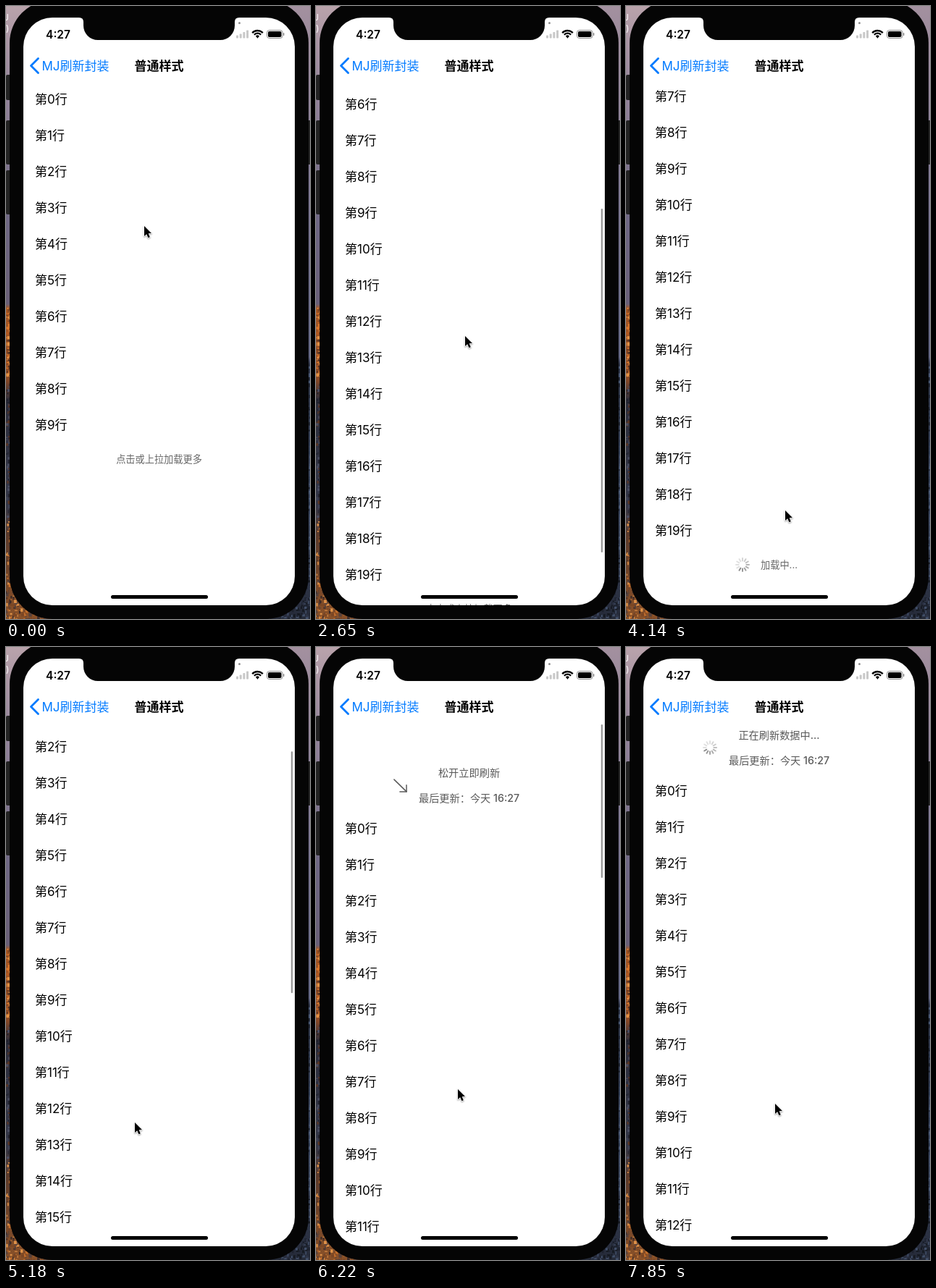
Animation, 420 px wide and 847 px high, one loop 8 s. Source, as an HTML page with a canvas:

```html
<!DOCTYPE html>
<html lang="zh-CN">
<head>
<meta charset="utf-8">
<title>普通样式</title>
<style>
html, body { margin: 0; width: 100%; height: 100%; overflow: hidden; background: #050505; }
canvas { display: block; width: 420px; height: 847px; }
</style>
</head>
<body>
<canvas id="stage"></canvas>
<script>
const W = 420, H = 847, LOOP = 8000, TICKS = 54, STEP = LOOP / TICKS;
const TOP = 104, BOTTOM = 828, ROW = 50, HEADER = 70;
const FONT = 'Inter, "Noto Sans CJK SC", "Noto Sans CJK", sans-serif';
const BLUE = '#007aff', GREY = '#5a5a5a';

const CURSOR = [
  [0, 191, 304], [3, 186, 565], [5, 183, 500], [6, 182, 491], [12, 182, 491],
  [15, 200, 690], [16, 203, 705], [18, 206, 456], [20, 206, 425], [24, 210, 440],
  [28, 220, 697], [31, 190, 394], [32, 187, 408], [33, 184, 488], [34, 181, 578],
  [35, 178, 657], [36, 178, 665], [39, 190, 400], [40, 192, 460], [41, 194, 520],
  [42, 196, 611], [44, 206, 631]
];
const SCROLL = [
  [0, 0], [3, 0], [5, 36], [6, 10], [7, 0], [16, 0], [17, 150], [18, 293], [19, 360],
  [20, 385], [22, 360], [23, 354], [31, 354], [32, 340], [33, 260], [34, 170], [35, 91],
  [36, 40], [37, 12], [38, 0], [39, 0], [40, -42], [41, -72], [42, -122], [44, -132],
  [45, -132], [46, -115], [47, -84], [48, -70]
];
const BAR_ALPHA = [[16, 0], [17, 1], [23, 1], [26, 0], [31, 0], [32, 1], [46, 1], [49, 0]];
const LOADS = [{ from: 5, to: 15, turn: 740 }, { from: 19, to: 29, turn: 3560 }];
const ARMED = 41, RELEASED = 46;

const canvas = document.getElementById('stage');
const dpr = window.devicePixelRatio || 1;
canvas.width = W * dpr;
canvas.height = H * dpr;
let c = canvas.getContext('2d');

const clamp = (v, a, b) => Math.min(b, Math.max(a, v));
const smooth = u => { u = clamp(u, 0, 1); return u * u * (3 - 2 * u); };

function track(keys, t) {
  const i = keys.findIndex(k => k[0] > t);
  if (i === 0) return keys[0].slice(1);
  if (i < 0) return keys[keys.length - 1].slice(1);
  const a = keys[i - 1], b = keys[i], u = (t - a[0]) / (b[0] - a[0]);
  return a.slice(1).map((v, n) => v + (b[n + 1] - v) * u);
}

function text(str, x, cy, size, color, align = 'left', weight = 400) {
  c.font = `${weight} ${size}px ${FONT}`;
  c.fillStyle = color;
  c.textAlign = align;
  c.fillText(str, x, cy + size * 0.37);
}

function box(x, y, w, h, r, color) {
  c.beginPath();
  c.roundRect(x, y, w, h, r);
  c.fillStyle = color;
  c.fill();
}

function line(points, width, color) {
  c.beginPath();
  points.forEach(p => c.lineTo(p[0], p[1]));
  c.lineWidth = width;
  c.strokeStyle = color;
  c.stroke();
}

function gradient(stops) {
  const g = c.createLinearGradient(0, 0, 0, H);
  stops.forEach(([y, color]) => g.addColorStop(y / H, color));
  return g;
}

function specks(x, y, w, h, count, colors, rand) {
  for (let i = 0; i < count; i++) {
    c.fillStyle = colors[Math.floor(rand() * colors.length)];
    c.fillRect(x + rand() * w, y + rand() * h, 1 + rand() * 3, 1 + rand() * 4);
  }
}

function wallpaper() {
  let seed = 7;
  const rand = () => (seed = (seed * 16807) % 2147483647) / 2147483647;
  c.fillStyle = gradient([[0, '#b9a3ab'], [120, '#93849a'], [300, '#6f6884'],
    [412, '#6a6078'], [418, '#a85a26'], [515, '#8a4a26'], [545, '#2b2c3a'],
    [690, '#343748'], [730, '#5b3a2a'], [H, '#8a5128']]);
  c.fillRect(0, 0, 210, H);
  c.fillStyle = gradient([[0, '#a3909f'], [250, '#7c7690'], [485, '#5f6380'],
    [495, '#2b3244'], [700, '#3c4860'], [H, '#252a38']]);
  c.fillRect(210, 0, 210, H);
  specks(0, 416, 5, 100, 90, ['#d9772c', '#b55a20', '#5d3420', '#e29145'], rand);
  specks(0, 520, 5, 190, 70, ['#20212c', '#4a4d61', '#5a3524'], rand);
  specks(0, 710, 58, 137, 650, ['#c56f2c', '#7b4624', '#3a2a28', '#dd9047', '#56413c'], rand);
  specks(416, 495, 4, 260, 70, ['#1d222e', '#4b5a75', '#2d3a50'], rand);
  specks(362, 755, 58, 92, 350, ['#1d222e', '#42506a', '#2d3345', '#161a22'], rand);
  text('J', -3, 16, 12, '#fff');
  text(')', 0, 31, 12, '#fff');
}

function body() {
  for (const [y, h] of [[95, 35], [158, 61], [227, 61]]) box(0, y, 8, h, 2, '#232323');
  box(414, 158, 8, 61, 2, '#232323');
  box(5, -8, 413, 855, 59, '#050505');
}

// Everything that never changes, painted once.
function backdrop() {
  const layer = document.createElement('canvas');
  layer.width = canvas.width;
  layer.height = canvas.height;
  const main = c;
  c = layer.getContext('2d');
  c.scale(dpr, dpr);
  wallpaper();
  body();
  box(24, 16, 375, 812, 40, '#fff');
  c = main;
  return layer;
}

function notch() {
  c.beginPath();
  c.moveTo(101, 15);
  c.lineTo(101, 16);
  c.quadraticCurveTo(107, 16, 107, 22);
  c.arcTo(107, 47, 130, 47, 20);
  c.arcTo(316, 47, 316, 25, 20);
  c.lineTo(316, 22);
  c.quadraticCurveTo(316, 16, 322, 16);
  c.lineTo(322, 15);
  c.fillStyle = '#050505';
  c.fill();
}

function statusBar() {
  text('4:27', 72, 39, 15.5, '#000', 'center', 600);
  c.beginPath();
  c.arc(322.5, 23.5, 1.5, 0, 7);
  c.fillStyle = '#8e8e8e';
  c.fill();
  [4, 6, 8.5, 11].forEach((h, i) => box(318 + i * 4.7, 44.5 - h, 3, h, 0.8, '#c8c8c8'));

  c.lineCap = 'butt';
  for (const r of [10, 6.3]) {
    c.beginPath();
    c.arc(347.5, 44, r, -Math.PI * 0.76, -Math.PI * 0.24);
    c.lineWidth = 2.3;
    c.strokeStyle = '#000';
    c.stroke();
  }
  c.beginPath();
  c.moveTo(347.5, 44.8);
  c.arc(347.5, 44, 3.5, -Math.PI * 0.76, -Math.PI * 0.24);
  c.fillStyle = '#000';
  c.fill();

  c.beginPath();
  c.roundRect(360.5, 33.5, 21.5, 11, 3.2);
  c.lineWidth = 1;
  c.strokeStyle = '#8c8c8c';
  c.stroke();
  box(362, 35, 18.5, 8, 1.8, '#000');
  box(383, 37, 1.4, 4, 0.7, '#8c8c8c');
}

function navBar() {
  c.lineCap = c.lineJoin = 'miter' && 'round';
  line([[44.5, 72.5], [34.5, 82.5], [44.5, 92.5]], 2.8, BLUE);
  text('MJ刷新封装', 49.5, 82.5, 17, BLUE);
  text('普通样式', 211.5, 82.5, 17, '#000', 'center', 600);
}

function spinner(x, y, ms) {
  const head = Math.floor((((ms / 1000) % 1 + 1) % 1) * 12 + 0.01);
  c.lineCap = 'round';
  for (let i = 0; i < 12; i++) {
    const age = (head - i + 12) % 12;
    const shade = Math.round(142 + 82 * Math.min(1, age / 8));
    const a = i * Math.PI / 6 - Math.PI / 2;
    const dx = Math.cos(a), dy = Math.sin(a);
    line([[x + dx * 5.4, y + dy * 5.4], [x + dx * 9, y + dy * 9]], 2,
      `rgb(${shade},${shade},${shade})`);
  }
}

function arrow(x, y, angle) {
  c.save();
  c.translate(x, y);
  c.rotate(-angle);
  c.lineCap = c.lineJoin = 'round';
  line([[0, -12], [0, 12]], 1.5, GREY);
  line([[-6.5, 5.5], [0, 12], [6.5, 5.5]], 1.5, GREY);
  c.restore();
}

function header(tick, ms, offset) {
  const y = TOP - offset - HEADER;
  const busy = tick >= RELEASED, armed = tick >= ARMED;
  const label = busy ? '正在刷新数据中...' : armed ? '松开立即刷新' : '下拉可以刷新';
  text(label, 211.5, y + 17.5, 14.2, GREY, 'center', 500);
  text('最后更新：今天 16:27', 211.5, y + 52.5, 14.2, GREY, 'center', 500);
  if (busy) spinner(116, y + 35, ms - 7150);
  else arrow(116.5, y + 35.5, Math.PI * smooth((tick - ARMED) * STEP / 450));
}

function footer(tick, ms, y) {
  const load = LOADS.find(l => tick >= l.from && tick < l.to);
  text(load ? '加载中...' : '点击或上拉加载更多', 211.5, y, 13.2, '#666', 'center');
  if (load) spinner(161, y, ms - load.turn);
}

function scrollBar(tick, rows, offset) {
  const alpha = track(BAR_ALPHA, tick)[0];
  if (!alpha || rows < 20) return;
  const start = 107, span = 684, full = rows === 20 ? 475 : 334;
  const max = rows * ROW + 44 - 690;
  const over = Math.max(0, -offset, offset - max);
  const len = full - over;
  const y = start + (span - len) * clamp(offset / max, 0, 1);
  c.globalAlpha = alpha;
  box(393.8, y, 2.4, len, 1.2, '#999');
  c.globalAlpha = 1;
}

function list(tick, ms) {
  const offset = track(SCROLL, tick)[0];
  const rows = 10 + 10 * LOADS.filter(l => tick >= l.to).length;
  c.save();
  c.beginPath();
  c.roundRect(24, 16, 375, 812, 40);
  c.clip();
  c.beginPath();
  c.rect(24, TOP, 375, BOTTOM - TOP);
  c.clip();
  if (offset < 0) header(tick, ms, offset);
  for (let i = 0; i < rows; i++) {
    const y = TOP + ROW * (i + 0.5) - offset;
    if (y > TOP - 20 && y < BOTTOM + 20) text(`第${i}行`, 40, y, 17, '#000');
  }
  footer(tick, ms, TOP + rows * ROW + 22 - offset);
  scrollBar(tick, rows, offset);
  c.restore();
}

function cursor(x, y) {
  c.save();
  c.translate(x, y);
  c.beginPath();
  [[0, 0], [0, 14], [3.2, 11.2], [5.4, 16.3], [7.8, 15.3], [5.7, 10.3], [10, 10]]
    .forEach(p => c.lineTo(p[0], p[1]));
  c.closePath();
  c.shadowColor = 'rgba(0,0,0,.4)';
  c.shadowBlur = 2 * dpr;
  c.shadowOffsetY = dpr;
  c.lineJoin = 'round';
  c.lineWidth = 1.6;
  c.strokeStyle = '#fff';
  c.stroke();
  c.shadowColor = 'transparent';
  c.fillStyle = '#000';
  c.fill();
  c.restore();
}

const base = backdrop();

function draw(tick) {
  const ms = tick * STEP;
  c.setTransform(1, 0, 0, 1, 0, 0);
  c.drawImage(base, 0, 0);
  c.scale(dpr, dpr);
  list(tick, ms);
  notch();
  statusBar();
  navBar();
  box(145, 814, 134, 5, 2.5, '#000');
  cursor(...track(CURSOR, tick));
}

const begin = performance.now();
let shown = -1;

function loop() {
  const t = (performance.now() - begin) % LOOP;
  const tick = Math.min(TICKS - 1, Math.floor((t + 20) / STEP));
  if (tick !== shown) draw(shown = tick);
  requestAnimationFrame(loop);
}
loop();
</script>
</body>
</html>
```
